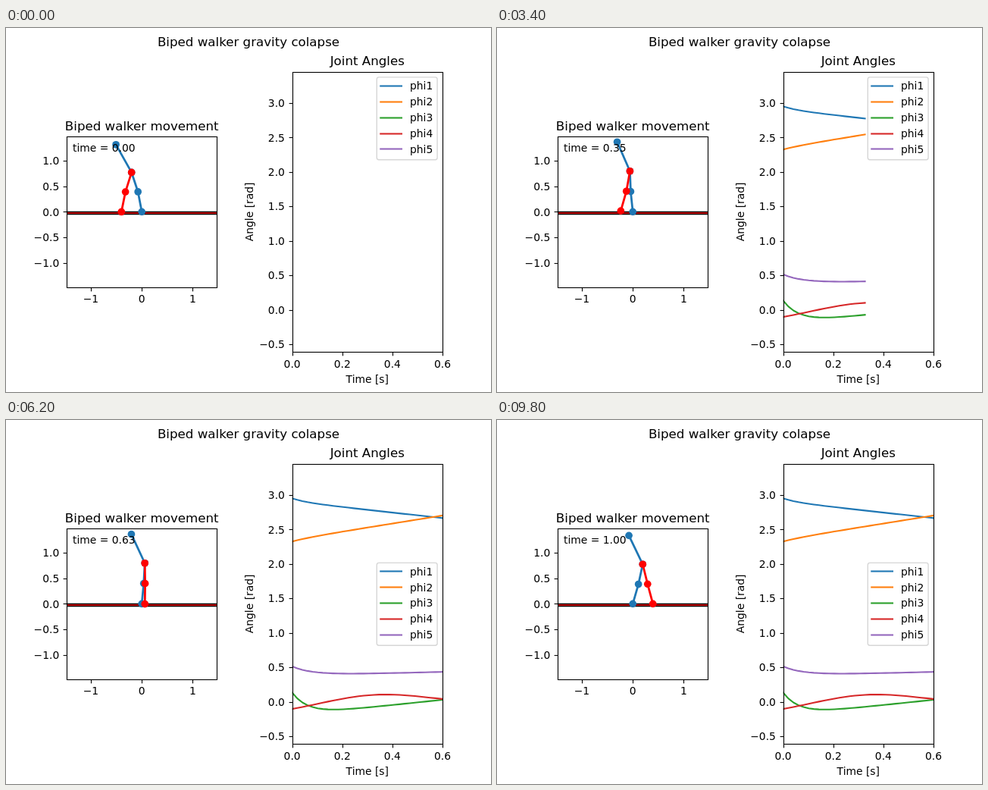
Animation, 640 px wide and 480 px high, one loop 10000 ms. Source, as an HTML page with a canvas:

```html
<!DOCTYPE html>
<html lang="en">
<head>
<meta charset="utf-8">
<title>Biped walker gravity colapse</title>
<style>
  html, body { margin: 0; width: 100%; height: 100%; overflow: hidden; background: #fff; }
  canvas { display: block; }
</style>
</head>
<body>
<canvas id="stage" width="640" height="480"></canvas>
<script>
const ctx = document.getElementById('stage').getContext('2d');
const STEPS = 50, STEP_MS = 200, PT = 100 / 72;
const COLORS = ['#1f77b4', '#ff7f0e', '#2ca02c', '#d62728', '#9467bd'];
const { sin, cos, exp, PI } = Math;

// Axes rectangles in pixels and their data-to-pixel mappings
const walkerAxes = { left: 80, right: 278.4, top: 143.2, bottom: 341.6 };
const anglesAxes = { left: 377.6, right: 576, top: 57.6, bottom: 427.2 };
const SCALE = 198.4 / 2.95;
const walkerX = x => 179.2 + x * SCALE;
const walkerY = y => 242.4 - y * SCALE;
const timeX = t => 377.6 + t * 198.4 / 0.6;
const angleY = a => 371.5 - a * 90.87;

// Joint angles: fast transients settling into a slow drift
const late = t => Math.max(0, t - 0.6) ** 2;
const PHI = [
  t => 2.905 - 0.4 * t + 0.045 * exp(-t / 0.06) - 0.15 * late(t),
  t => 2.353 + 0.582 * t - 0.028 * exp(-t / 0.08),
  t => -0.2 + 0.38 * t + 0.332 * exp(-t / 0.063) - 0.7 * late(t),
  t => {
    const [depth, width] = t < 0.37 ? [0.342, 0.38] : [0.125, 0.27];
    return 0.104 - depth * (1 - exp(-(((t - 0.37) / width) ** 2)));
  },
  t => 0.38 + 0.088 * t + 0.132 * exp(-t / 0.08) - 0.12 * late(t)
];

const snap = v => Math.floor(v + 0.5) + 0.5;

function text(str, x, y, size = 10, align = 'left') {
  ctx.font = `${size * PT}px "DejaVu Sans", sans-serif`;
  ctx.textAlign = align;
  ctx.fillStyle = '#000';
  ctx.fillText(str, x, y);
}

function polyline(points, color, width) {
  ctx.beginPath();
  points.forEach(([x, y]) => ctx.lineTo(x, y));
  ctx.strokeStyle = color;
  ctx.lineWidth = width * PT;
  ctx.stroke();
}

function clipped(axes, draw) {
  ctx.save();
  ctx.beginPath();
  ctx.rect(axes.left, axes.top, axes.right - axes.left, axes.bottom - axes.top);
  ctx.clip();
  draw();
  ctx.restore();
}

function limb(points, color) {
  const pixels = points.map(([x, y]) => [walkerX(x), walkerY(y)]);
  polyline(pixels, color, 2);
  ctx.fillStyle = color;
  for (const [x, y] of pixels) {
    ctx.beginPath();
    ctx.arc(x, y, 3.5 * PT, 0, 2 * PI);
    ctx.fill();
  }
}

function drawWalker(t) {
  const [hip1, hip2, knee1, knee2, torso] = PHI.map(phi => phi(t));
  const from = ([x, y], angle, length) => [x - length * sin(angle), y + length * cos(angle)];
  const thigh1 = hip1 + torso, thigh2 = hip2 + torso;
  const foot = [0, 0];
  const knee = from(foot, thigh1 - knee1, -0.4);
  const hip = from(knee, thigh1, -0.4);
  const head = from(hip, torso, 0.625);
  const swingKnee = from(hip, thigh2, 0.4);
  const swingFoot = from(swingKnee, thigh2 - knee2, 0.4);

  ctx.fillStyle = '#f00';
  ctx.fillRect(70, 242.5, 220, 3);
  for (const y of [242.5, 245.5]) polyline([[70, y], [290, y]], '#000', 1.1);
  limb([foot, knee, hip, head], COLORS[0]);
  limb([hip, swingKnee, swingFoot], '#f00');
}

function drawCurves(count) {
  if (count < 2) return;
  PHI.forEach((phi, k) => {
    const points = Array.from({ length: count }, (_, n) => {
      const t = n / (STEPS - 1);
      return [timeX(t), angleY(phi(t))];
    });
    polyline(points, COLORS[k], 1.5);
  });
}

function drawFrame({ left, right, top, bottom }) {
  ctx.strokeStyle = '#000';
  ctx.lineWidth = 0.8 * PT;
  ctx.strokeRect(snap(left), snap(top), snap(right) - snap(left), snap(bottom) - snap(top));
}

const TICK = 3.5 * PT;
const label = (value, digits) => value.toFixed(digits).replace('-', '\u2212');

function xTick(axes, value, x, digits) {
  const y = snap(axes.bottom);
  ctx.fillStyle = '#000';
  ctx.fillRect(snap(x) - 0.55, y, 1.11, TICK);
  text(label(value, digits), x, Math.round(axes.bottom + 20.4), 10, 'center');
}

function yTick(axes, value, y) {
  const x = snap(axes.left);
  ctx.fillStyle = '#000';
  ctx.fillRect(x - TICK, snap(y) - 0.55, TICK, 1.11);
  text(label(value, 1), axes.left - 2 * TICK, Math.round(y + 5.2), 10, 'right');
}

function drawLegend(top) {
  ctx.beginPath();
  ctx.roundRect(489.3, top, 79.8, 108.8, 2.8);
  ctx.fillStyle = 'rgba(255,255,255,0.8)';
  ctx.fill();
  ctx.strokeStyle = 'rgba(204,204,204,0.8)';
  ctx.lineWidth = PT;
  ctx.stroke();
  COLORS.forEach((color, k) => {
    const y = top + 11.4 + k * 20.9;
    polyline([[494.3, snap(y - 0.5)], [522, snap(y - 0.5)]], color, 1.5);
    text('phi' + (k + 1), 533, Math.round(y + 4.8));
  });
}

function draw(step) {
  const t = step / (STEPS - 1);
  ctx.fillStyle = '#fff';
  ctx.fillRect(0, 0, 640, 480);
  ctx.lineCap = 'square';
  ctx.lineJoin = 'round';

  clipped(walkerAxes, () => drawWalker(t));
  clipped(anglesAxes, () => drawCurves(step));

  ctx.lineJoin = 'miter';
  drawFrame(walkerAxes);
  drawFrame(anglesAxes);
  for (const v of [-1, 0, 1]) xTick(walkerAxes, v, walkerX(v), 0);
  for (const v of [-1, -0.5, 0, 0.5, 1]) yTick(walkerAxes, v, walkerY(v));
  for (const v of [0, 0.2, 0.4, 0.6]) xTick(anglesAxes, v, timeX(v), 1);
  for (let v = -0.5; v <= 3; v += 0.5) yTick(anglesAxes, v, angleY(v));

  text('Biped walker gravity colapse', 320, 24, 12, 'center');
  text('Biped walker movement', 179.2, 135, 12, 'center');
  text('Joint Angles', 476.8, 49, 12, 'center');
  text('Time [s]', 476.8, 468, 10, 'center');
  ctx.save();
  ctx.translate(326, 242.4);
  ctx.rotate(-PI / 2);
  text('Angle [rad]', 0, 0, 10, 'center');
  ctx.restore();
  text('time = ' + t.toFixed(2), 88, 163);

  // The legend moves down once the curves reach it
  drawLegend(step < 18 ? 64.9 : 188.4);
}

const start = performance.now();
function tick() {
  draw(Math.floor((performance.now() - start) / STEP_MS) % STEPS);
  requestAnimationFrame(tick);
}
tick();
</script>
</body>
</html>
```
